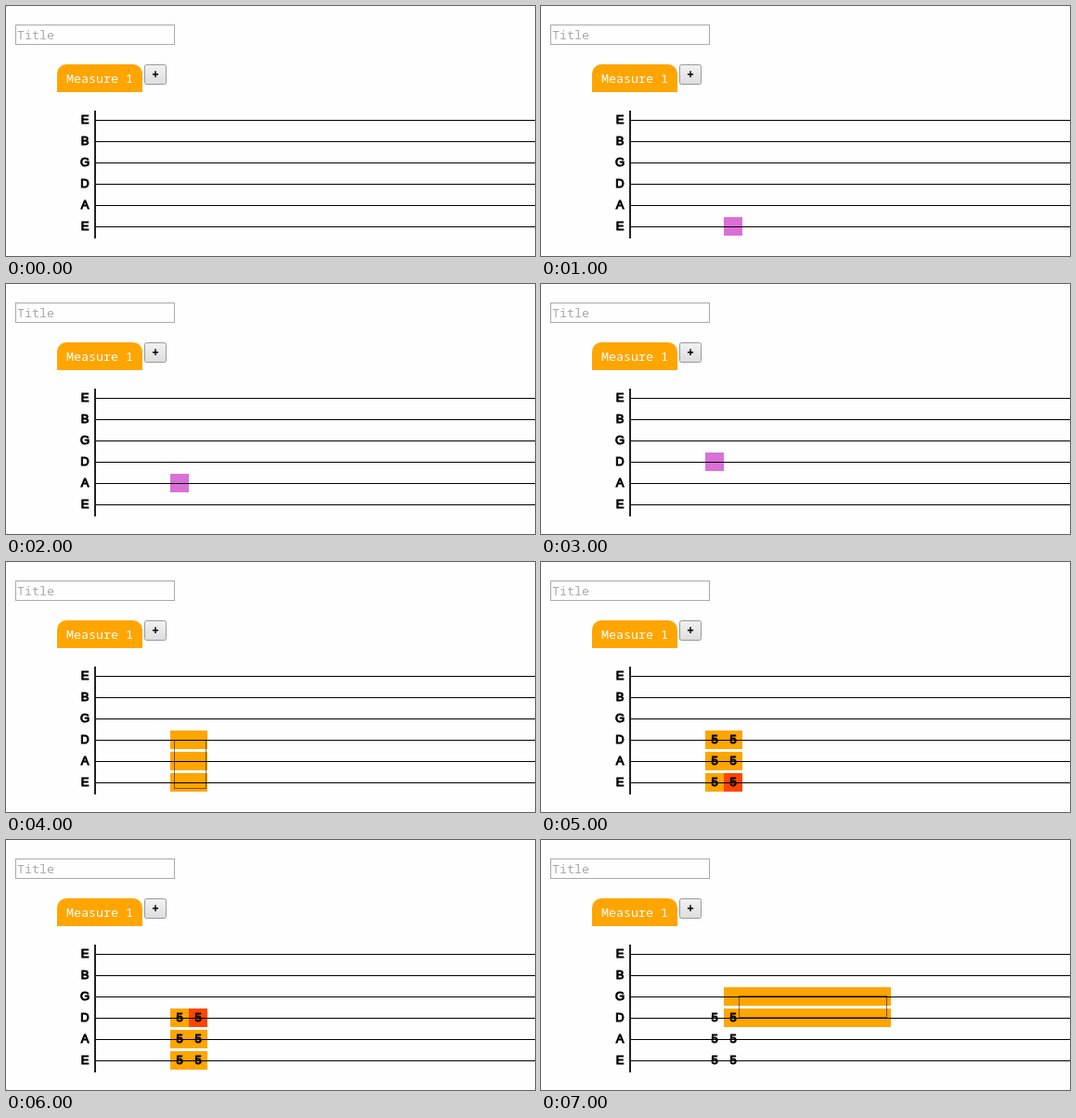
An HTML page with a canvas that plays this animation: 570 px wide and 270 px high, repeating every 8000 ms.

```html
<!DOCTYPE html>
<html lang="en">
<head>
<meta charset="utf-8">
<title>Tab editor</title>
<style>
  html, body { margin: 0; width: 100%; height: 100%; overflow: hidden; background: #fefefe; }
  canvas { display: block; }
</style>
</head>
<body>
<canvas id="stage" width="570" height="270"></canvas>
<script>
const ctx = document.getElementById('stage').getContext('2d');
const STEP = 1000, STEPS = 8;
const CELL = 20, GAP = 23, TOP = 123, COL = 177;
const STRINGS = ['E', 'B', 'G', 'D', 'A', 'E'];
const ORANGE = '#ffa500', ORCHID = '#da70d6', RED = '#ff4500';
const MONO = '13.33px "Noto Sans Mono", monospace';

const lineY = row => TOP + row * GAP;

function fill(color, x, y, w, h) {
  ctx.fillStyle = color;
  ctx.fillRect(x, y, w, h);
}

function label(text, x, y, color, font = MONO) {
  ctx.font = font;
  ctx.textAlign = 'left';
  ctx.fillStyle = color;
  ctx.fillText(text, x, y);
}

function cells(color, col, row, cols = 1, rows = 1) {
  for (let r = row; r < row + rows; r++) {
    fill(color, COL + col * CELL, lineY(r) - 10, cols * CELL, CELL);
  }
}

function glyph(text, x, row) {
  ctx.font = '13px "Liberation Sans", Arial, sans-serif';
  ctx.textAlign = 'center';
  ctx.fillStyle = ctx.strokeStyle = '#000';
  ctx.lineWidth = 1;
  ctx.fillText(text, x, lineY(row) + 4);
  ctx.strokeText(text, x, lineY(row) + 4);
}

function lasso(x, y, w, h) {
  ctx.strokeStyle = '#000';
  ctx.lineWidth = 1;
  ctx.setLineDash([1, 1]);
  ctx.strokeRect(x + 0.5, y + 0.5, w, h);
  ctx.setLineDash([]);
}

function header() {
  ctx.lineWidth = 1;
  ctx.strokeStyle = '#a9a9a9';
  ctx.strokeRect(10.5, 20.5, 171, 21);
  label('Title', 12, 36, '#a9a9a9');

  ctx.fillStyle = ORANGE;
  ctx.beginPath();
  ctx.roundRect(55, 63, 92, 30, [10, 10, 0, 0]);
  ctx.fill();
  label('Measure 1', 65, 83, '#fff');

  const shade = ctx.createLinearGradient(0, 63, 0, 85);
  shade.addColorStop(0, '#f2f2f2');
  shade.addColorStop(1, '#dddddd');
  ctx.fillStyle = shade;
  ctx.strokeStyle = '#999';
  ctx.beginPath();
  ctx.roundRect(149.5, 63.5, 23, 21, 2);
  ctx.fill();
  ctx.stroke();
  label('+', 157, 79, '#000', 'bold ' + MONO);
}

function highlights(step) {
  if (step === 1) cells(ORCHID, 1, 5);
  if (step === 2) cells(ORCHID, 0, 4);
  if (step === 3) cells(ORCHID, 0, 3);
  if (step >= 4 && step <= 6) cells(ORANGE, 0, 3, 2, 3);
  if (step === 5) cells(RED, 1, 5);
  if (step === 6) cells(RED, 1, 3);
  if (step === 7) cells(ORANGE, 1, 2, 9, 2);
}

function draw(step) {
  fill('#fefefe', 0, 0, 570, 270);
  header();
  highlights(step);

  STRINGS.forEach((name, row) => {
    fill('#000', 97, lineY(row), 473, 1);
    glyph(name, 85, row);
  });
  fill('#222', 95, 113, 2, 138);

  if (step >= 5) {
    for (let row = 3; row < 6; row++) {
      glyph('5', COL + 10, row);
      glyph('5', COL + 30, row);
    }
  }
  if (step === 4) lasso(181, 192, 34, 52);
  if (step === 7) lasso(213, 168, 159, 23);
}

function frame() {
  draw(Math.floor(performance.now() / STEP) % STEPS);
  requestAnimationFrame(frame);
}
frame();
</script>
</body>
</html>
```
